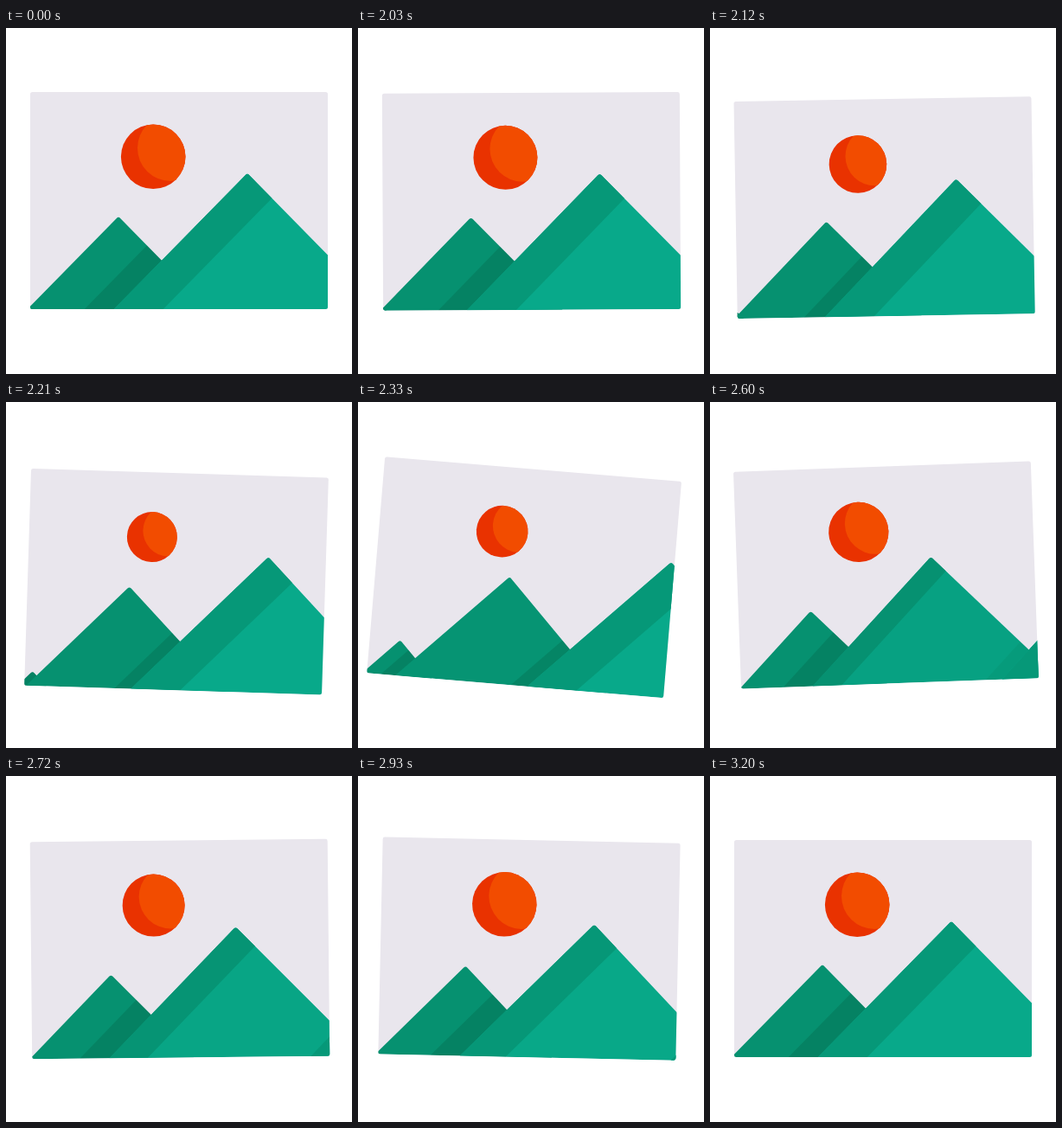
An HTML page with a canvas that plays this animation: 400x400 px, repeating every 3.23 s.

```html
<!DOCTYPE html>
<html>
<head>
<meta charset="utf-8">
<style>
html, body { margin: 0; height: 100%; overflow: hidden; background: #fff; }
canvas { display: block; width: 400px; height: 400px; }
</style>
</head>
<body>
<canvas id="stage"></canvas>
<script>
const LOOP = 3230, REST = 2000, MOVE = 1200, STEP = 30;
const BASE = 325, SLOPE = 1.02, BAND_WIDTH = 57;
const canvas = document.getElementById('stage');
const ctx = canvas.getContext('2d');
const density = window.devicePixelRatio || 1;
canvas.width = canvas.height = 400 * density;

const clamp = u => Math.min(1, Math.max(0, u));
const ease = (t, from, to) => (1 - Math.cos(Math.PI * clamp((t - from) / (to - from)))) / 2;

// Wind up, overshoot and settle, in degrees.
const tilt = t => -1.2 * ease(t, 0, 90) + 6 * ease(t, 90, 330)
  - 6.9 * ease(t, 330, 580) + 3.4 * ease(t, 580, 880) - 1.3 * ease(t, 880, MOVE);

const drop = t => 9 * ease(t, 0, 150) - 8.4 * ease(t, 150, 450) - .6 * ease(t, 450, MOVE);

const sunScale = t =>
  1 - .245 * (t < 260 ? ease(t, 0, 260) : clamp((1000 - t) / 740) ** 2);

// Quick start with a long tail.
const surge = t => t ** 3.4 / (t ** 3.4 + 396 ** 3.4);
const travel = t => surge(t) / surge(MOVE);

const mix = (a, b, u) => a.map((v, i) => Math.round(v + (b[i] - v) * u));
const DIM = [6, 145, 112], BRIGHT = [8, 169, 138];
const BAND_DIM = [5, 135, 104], BAND = [6, 152, 120];

const footOf = m => m.x - (BASE - m.y) / SLOPE;

// Strip parallel to the left slopes, between two points on the base line.
function slab(from, to, color) {
  const h = 300, dx = h / SLOPE;
  ctx.fillStyle = color;
  ctx.beginPath();
  ctx.moveTo(from, BASE);
  ctx.lineTo(from + dx, BASE - h);
  ctx.lineTo(to + dx, BASE - h);
  ctx.lineTo(to, BASE);
  ctx.fill();
}

function mountain(m, next, shade, alpha = 1) {
  const foot = footOf(m), right = 2 * m.x - foot;
  ctx.save();
  ctx.beginPath();
  ctx.moveTo(foot, BASE);
  ctx.arcTo(m.x, m.y, right, BASE, 3);
  ctx.lineTo(right, BASE);
  ctx.closePath();
  ctx.fillStyle = `rgb(${m.face})`;
  ctx.fill();
  ctx.clip();
  if (m.width) slab(foot - 9, foot + m.width, `rgb(${m.band})`);
  if (next) {
    const edge = footOf(next);
    slab(edge - shade, edge + 2, `rgba(0,80,50,${.22 * alpha})`);
  }
  ctx.restore();
}

function disc(x, y, r, color) {
  ctx.beginPath();
  ctx.arc(x, y, r, 0, 7);
  ctx.fillStyle = color;
  ctx.fill();
}

function sun(scale) {
  ctx.save();
  ctx.translate(170.2, 148.8);
  ctx.scale(scale, scale);
  disc(0, 0, 37.3, '#e93200');
  ctx.clip();
  disc(20 + 20 * (1 - scale), -10, 38.2, '#f24c00');
  ctx.restore();
}

// Each mountain moves right into the place of the next one.
function mountains(t) {
  const p = travel(t), grown = clamp((p - .57) / .43);
  const far = {
    x: 26 + 104 * p,
    y: 319 - 101.3 * p + 160 * p ** 4 * (1 - p) ** 2,
    face: DIM
  };
  const middle = {
    x: 130 + 149 * p,
    y: 217.7 - 50 * p - 5.5 * Math.sin(2 * Math.PI * p ** .65),
    face: mix(DIM, BRIGHT, p * p),
    band: mix(BAND_DIM, BAND, grown),
    width: BAND_WIDTH * grown
  };
  const near = { x: 279 + 249 * p, y: 167.7, face: BRIGHT, band: BAND, width: BAND_WIDTH };

  mountain(far, middle, 17 + 17 * ease(t, 330, 530));
  mountain(middle, near, 34 - 15 * ease(t, 0, 200), 1 - ease(t, 480, 680));
  mountain(near);
}

function draw(t) {
  ctx.setTransform(density, 0, 0, density, 0, 0);
  ctx.fillStyle = '#fff';
  ctx.fillRect(0, 0, 400, 400);
  ctx.save();
  ctx.translate(200, 105 + drop(t));
  ctx.rotate(tilt(t) * Math.PI / 180);
  ctx.translate(-200, -105);
  ctx.beginPath();
  ctx.roundRect(28, 74, 344, BASE - 74, 2.5);
  ctx.fillStyle = '#e9e6ed';
  ctx.fill();
  ctx.clip();
  sun(sunScale(t));
  mountains(t);
  ctx.restore();
}

function tick() {
  const t = performance.now() % LOOP - REST;
  draw(Math.max(0, Math.floor(t / STEP) * STEP));
  requestAnimationFrame(tick);
}
tick();
</script>
</body>
</html>
```
